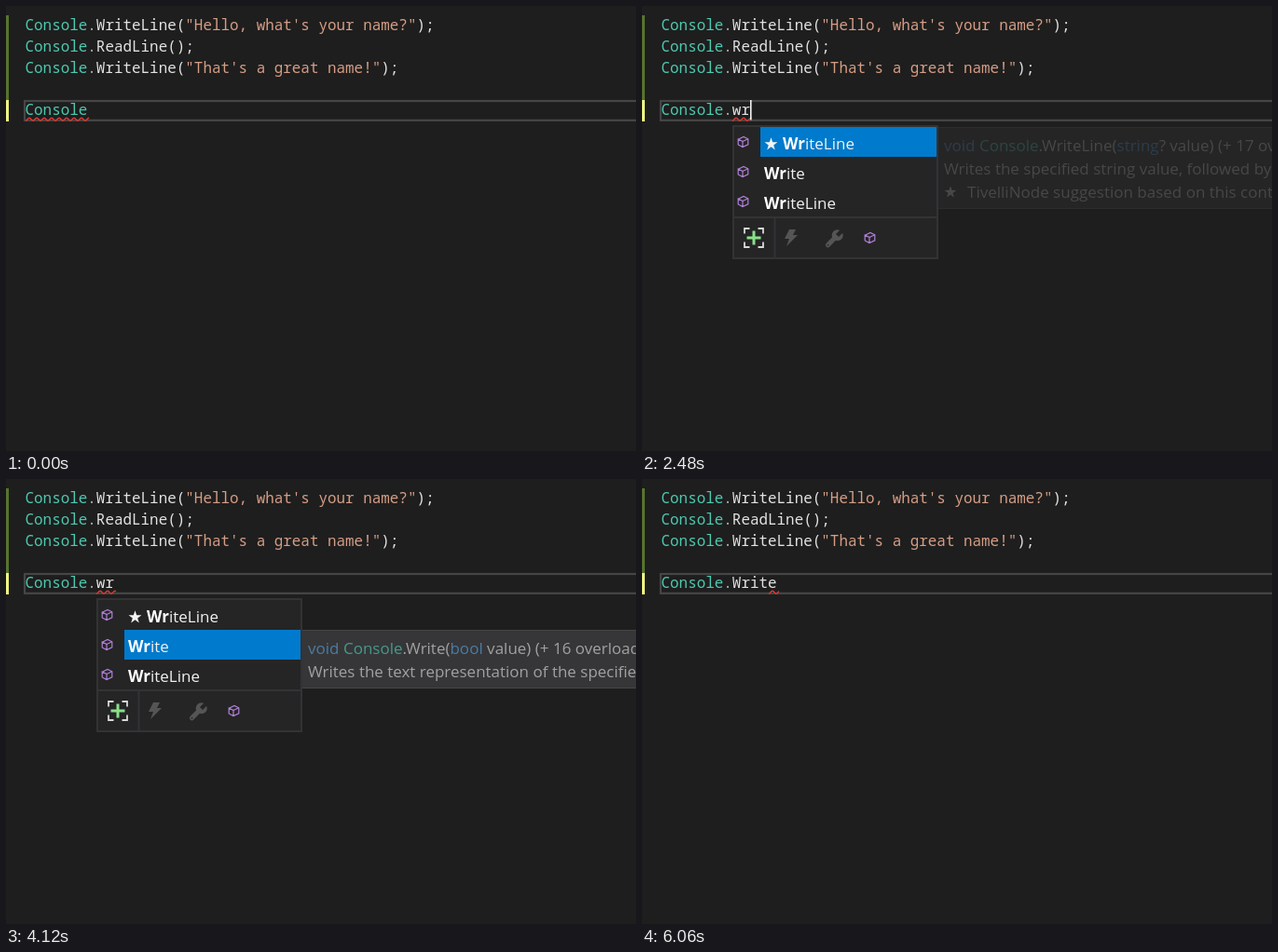
An HTML page with a canvas that plays this animation: 676 px wide and 478 px high, repeating every 6710 ms.

```html
<!DOCTYPE html>
<html lang="en">
<head>
<meta charset="utf-8">
<title>Code completion</title>
<style>
html, body { margin: 0; width: 100%; height: 100%; overflow: hidden; background: #1e1e1e; }
canvas { display: block; }
</style>
</head>
<body>
<canvas id="stage" width="676" height="478"></canvas>
<script>
const c = document.getElementById('stage').getContext('2d');
const LOOP = 6710, LEFT = 20.5, ADVANCE = 9.55, ROW = 32;
const CODE = '15.92px "Noto Sans Mono", monospace';
const UI = '17px "Open Sans", sans-serif';
const TYPE = '#4ec9b0', PLAIN = '#e2e2e2', STRING = '#d69d85', DOT = '#b4b4b4';
const KEYWORD = '#569cd6', TIP = '#d4d4d4', PANEL = '#252526', EDGE = '#333336';
const PURPLE = '#b180d7', GREY = '#c8c8c8', DIM = '#555';

const ALL = ['*WriteLine', 'Error', '*Out', '*ForegroundColor', 'BackgroundColor', 'Beep', 'BufferHeight', 'BufferWidth'];
ALL[1] = '*Error';
const W_LIST = ['*WriteLine', 'WindowHeight', 'WindowLeft', 'WindowTop', 'WindowWidth', 'Write', 'WriteLine', 'LargestWindowHeight'];
const WR_LIST = ['*WriteLine', 'Write', 'WriteLine'];
const METHODS = ['*WriteLine', 'WriteLine', 'Write', 'Beep'];

const TIPS = [
  [[['void ', KEYWORD], ['Console', TYPE], ['.WriteLine(', TIP], ['string', KEYWORD], ['? value) (+ 17 overloads)', TIP]],
   [['Writes the specified string value, followed by the current', TIP]],
   [['TivelliNode suggestion based on this context', TIP]]],
  [[['void ', KEYWORD], ['Console', TYPE], ['.Write(', TIP], ['bool', KEYWORD], [' value) (+ 16 overloads)', TIP]],
   [['Writes the text representation of the specified Boolean', TIP]]]
];

// Each entry is [start time, value]
const TYPED = [[0, ''], [1270, '.'], [1650, '.w'], [2000, '.wr'], [4480, '.Write']];
const CARET = [[0, 0], [650, 1], [1170, 0], [1270, 1], [2510, 0], [3040, 1], [3570, 0], [4150, 1], [5000, 0], [5530, 1], [6060, 0]];
const SQUIGGLE = [[0, [21, 89]], [1760, null], [1820, [97, 108]], [2150, [97, 118]], [4510, null], [4620, [147, 157]], [5020, [136, 147]]];
const LIST = [[0, null], [1370, ALL], [1710, W_LIST], [2070, WR_LIST], [4480, null]];

const at = (track, t) => track.filter(step => step[0] <= t).pop()[1];

function box(x, y, w, h, color) {
  c.fillStyle = color;
  c.fillRect(x, y, w, h);
}

function path(points, close) {
  c.beginPath();
  points.forEach(([x, y]) => c.lineTo(x, y));
  if (close) c.closePath();
}

function line(color, width, ...points) {
  path(points);
  c.strokeStyle = color;
  c.lineWidth = width;
  c.stroke();
}

function shape(color, points) {
  path(points, true);
  c.fillStyle = color;
  c.fill();
}

function text(x, y, runs, font = UI) {
  for (const [s, color, bold] of runs) {
    c.font = (bold ? 'bold ' : '') + font;
    c.fillStyle = color;
    c.fillText(s, x, y);
    x += c.measureText(s).width;
  }
}

function star(x, y, r, color) {
  shape(color, Array.from({ length: 10 }, (_, i) => {
    const a = i * Math.PI / 5, d = i % 2 ? r * 0.39 : r;
    return [x + d * Math.sin(a), y - d * Math.cos(a)];
  }));
}

function cube(x, y) {
  const p = (dx, dy) => [x + dx, y + dy];
  line(PURPLE, 1.2, p(-5.3, -2.8), p(0.5, -5.6), p(5.3, -3.2), p(5.3, 2.8), p(-0.5, 5.6), p(-5.3, 3), p(-5.3, -2.8), p(-0.5, -0.5), p(-0.5, 5.6));
  line(PURPLE, 1.2, p(-0.5, -0.5), p(5.3, -3.2));
}

function wrench(x, y, color) {
  c.lineCap = 'round';
  line(color, 5.2, [x - 6.5, y + 6.7], [x + 2, y - 2]);
  c.lineCap = 'butt';
  c.beginPath();
  c.arc(x + 3.7, y - 3.7, 6, 0, 7);
  c.fillStyle = color;
  c.fill();
  line(PANEL, 4.2, [x + 3.5, y - 3.5], [x + 10, y - 10]);
  box(x - 7.2, y + 6, 1.5, 1.5, PANEL);
}

function bolt(x, y, color) {
  shape(color, [[-2, -9], [5, -9], [2, -3], [7, -3], [-5, 9], [-2, 1], [-7, 1]].map(([a, b]) => [x + a, y + b]));
}

function expander(x, y) {
  for (const sx of [-1, 1]) for (const sy of [-1, 1])
    line('#d8d8d8', 1.8, [x + sx * 4.5, y + sy * 10], [x + sx * 10, y + sy * 10], [x + sx * 10, y + sy * 4.5]);
  line('#89e089', 3, [x - 7.5, y], [x + 7.5, y]);
  line('#89e089', 3, [x, y - 7.5], [x, y + 7.5]);
}

function editor(t) {
  box(0, 0, 676, 478, '#1e1e1e');
  box(0, 10, 3, 91, '#577430');
  box(0, 101, 3, 23, '#eff284');
  c.strokeStyle = '#464646';
  c.lineWidth = 2.2;
  c.strokeRect(20, 102, 680, 20.8);

  const call = (y, method, arg) => text(LEFT, y,
    [['Console', TYPE], ['.', DOT], [method + '(', PLAIN], [arg, STRING], [');', PLAIN]], CODE);
  call(26, 'WriteLine', '"Hello, what\'s your name?"');
  call(49, 'ReadLine', '');
  call(72, 'WriteLine', '"That\'s a great name!"');

  const typed = at(TYPED, t), error = at(SQUIGGLE, t);
  text(LEFT, 117, [['Console', TYPE], [typed.slice(0, 1), DOT], [typed.slice(1), PLAIN]], CODE);
  if (error) {
    const wave = [];
    for (let x = error[0]; x <= error[1]; x++) wave.push([x, 121.7 + 1.6 * Math.cos((x - error[0]) * Math.PI / 4)]);
    line('#e5392f', 1.3, ...wave);
  }
  if (at(CARET, t)) box(Math.round(LEFT + (7 + typed.length) * ADVANCE), 101, 1.6, 21.5, '#f0f0f0');
}

function row(name, y, match) {
  if (METHODS.includes(name)) cube(108.5, y + 16);
  else wrench(112, y + 17, GREY);
  let x = 131;
  if (name[0] === '*') {
    star(138.5, y + 18.5, 7.3, '#f5f5f5');
    name = name.slice(1);
    x = 151;
  }
  const i = name.toLowerCase().indexOf(match), end = i + match.length;
  text(x, y + 24, [[name.slice(0, i), '#f1f1f1'], [name.slice(i, end), '#fff', true], [name.slice(end), '#f1f1f1']]);
}

function popup(items, selected, match) {
  const full = items === ALL, right = full ? 321 : 317;
  const foot = 130 + items.length * ROW, mid = foot + 23;
  box(97, 128, right - 97 + 1, foot + 46 - 128, EDGE);
  box(99, 130, right - 100, foot + 42 - 128, PANEL);
  box(127, 130 + selected * ROW, (full ? 294 : 316) - 127, ROW, '#007acc');
  items.forEach((name, i) => row(name, 130 + i * ROW, match));
  if (full) {
    box(294, 130, 26, foot - 130, '#3e3e42');
    box(300, 156, 14, 30, '#686868');
    shape('#999', [[300, 147], [307, 139], [314, 147]]);
    shape('#999', [[300, 369], [314, 369], [307, 377]]);
  }
  box(98, foot, right - 97, 2, EDGE);
  box(141.5, foot, 2, 45, EDGE);
  expander(120, mid);
  bolt(160, mid, full ? '#ffcc8f' : DIM);
  wrench(206, mid + 1, items === WR_LIST ? DIM : GREY);
  cube(244.5, mid);
}

function tooltip(index, start, t) {
  const top = 130 + index * ROW, lines = TIPS[index];
  c.globalAlpha = Math.min(1, 0.2 + 0.16 * Math.floor((t - start) / 30));
  box(318, top, 358, 13 + lines.length * 25, '#424245');
  box(318, top, 358, 1, '#4d4d50');
  box(318, top + 12 + lines.length * 25, 358, 1, '#4d4d50');
  lines.forEach((runs, i) => {
    if (i === 2) star(331, top + 70, 6.8, TIP);
    text(i === 2 ? 349 : 324, top + 26 + i * 25, runs);
  });
  c.globalAlpha = 1;
}

function draw(t) {
  editor(t);
  const items = at(LIST, t);
  if (!items) return;
  popup(items, t < 3610 ? 0 : 1, items === ALL ? '' : items === W_LIST ? 'w' : 'wr');
  if (t >= 2480 && t < 3610) tooltip(0, 2480, t);
  if (t >= 4030) tooltip(1, 4030, t);
  if (t >= 3610 && t < 3780) {
    c.globalAlpha = t < 3700 ? 1 : 0.5;
    box(318, 130, 13, 13, '#555558');
    box(319, 131, 11, 11, '#424245');
    c.globalAlpha = 1;
  }
}

const begin = performance.now();
function tick() {
  draw((performance.now() - begin) % LOOP);
  requestAnimationFrame(tick);
}
tick();
</script>
</body>
</html>
```
